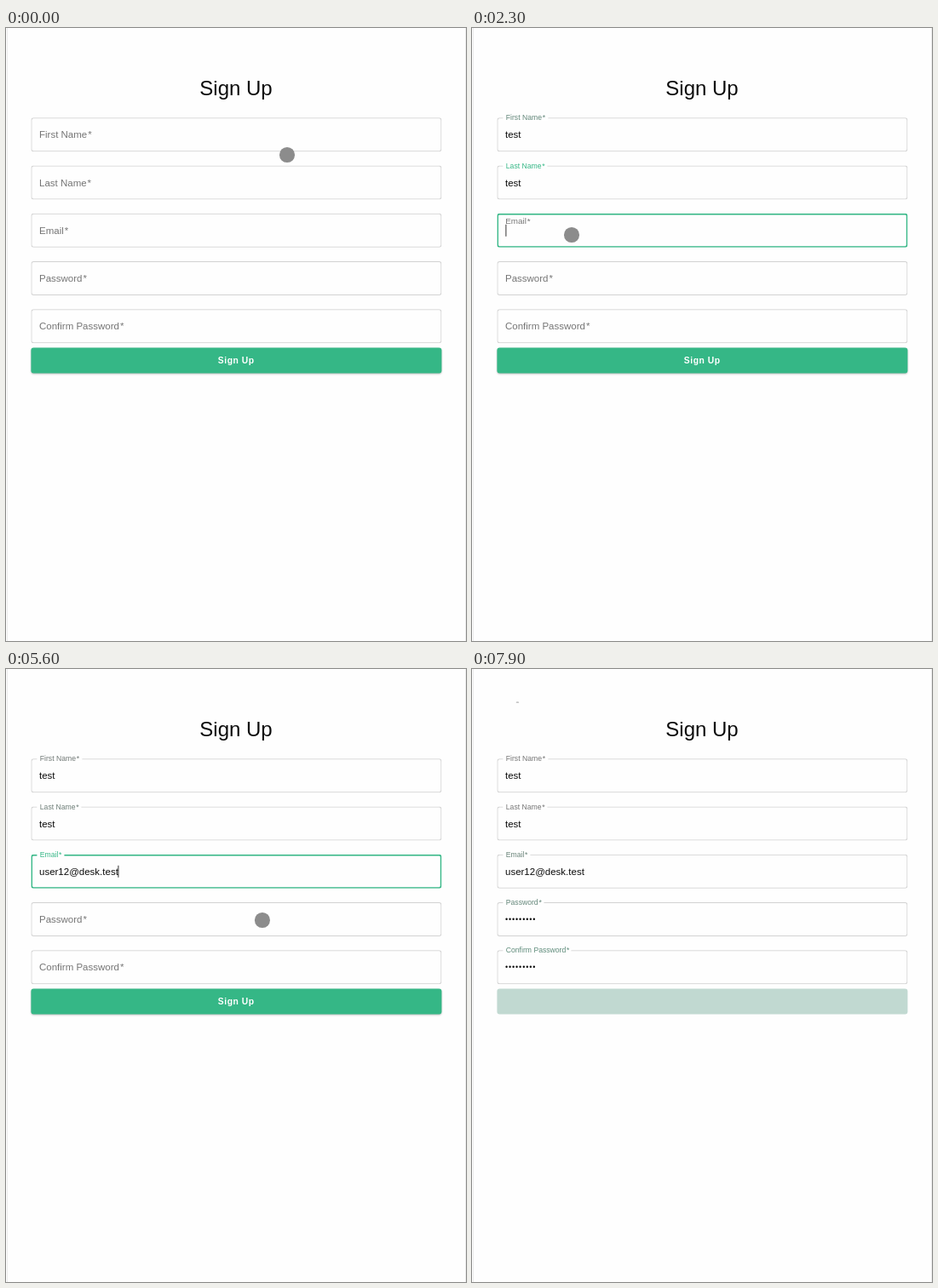
Animation of 540 by 720 pixels, one loop 8000 ms. Source, as an HTML page:

```html
<!DOCTYPE html>
<html lang="en">
<head>
<meta charset="utf-8">
<title>Sign Up</title>
<style>
  html, body { margin: 0; width: 100%; height: 100%; overflow: hidden; background: #fefefe; }
  #stage {
    position: relative; width: 540px; height: 720px; overflow: hidden;
    font-family: "Liberation Sans", Arial, sans-serif;
  }
  #stage > *, .field > * { position: absolute; }
  #stage::before {
    content: ""; position: absolute; inset: 0 0 0 1px;
    border: solid #ececec; border-width: 0 1px;
  }
  h1 {
    top: 56px; width: 100%; margin: 0; color: #0c0c0c;
    font-size: 24px; font-weight: 400; line-height: 30px; text-align: center;
  }
  .field { width: 481.6px; height: 39.6px; font-size: 11.5px; line-height: 14px; white-space: pre; }
  .box { inset: 0; border-radius: 3px; box-shadow: inset 0 0 0 1px #d2d2d2; }
  .focus .box { box-shadow: inset 0 0 0 1.6px #35b786; }
  .notch { left: 7px; top: -1px; height: 4px; background: #fefefe; }
  .label { left: 9.6px; top: 12.7px; transform-origin: 0 0; }
  .label i { margin-left: 1px; font-style: normal; }
  .value { left: 9.6px; top: 12.7px; height: 14px; color: #0c0c0c; }
  .secret .value { font-size: 9px; letter-spacing: .88px; }
  .focus .value { border-right: 1px solid #333; }
  #button {
    width: 481.6px; height: 29.6px; border-radius: 3px; transform: translate(29.4px, 375.6px);
    background: #35b786; box-shadow: 0 1px 2px rgba(0, 0, 0, .25); color: #fff;
    font-size: 10.3px; font-weight: 700; line-height: 29px; letter-spacing: .55px; text-align: center;
  }
  .sent #button { background: #c1d9d1; box-shadow: none; color: transparent; }
  #pointer { left: -8.75px; top: -8.75px; width: 17.5px; height: 17.5px; border-radius: 50%; background: #8c8c8c; }
  .sent #pointer { opacity: .5; scale: .2 .1; }
</style>
</head>
<body>
<div id="stage">
  <h1>Sign Up</h1>
  <div id="button">Sign Up</div>
  <div id="pointer"></div>
</div>
<script>
const LOOP = 8000, STEP = 100, SUBMIT = 7900;
const FLOAT = 200, TYPING = 400, TRAVEL = 300;
const GREEN = '#35b786', GRAY = '#757575';
const DOTS = '•'.repeat(9);

// A field keeps the focus until the next one takes it.
const fields = [
  { name: 'First Name', text: 'test', focus: 330, type: 600 },
  { name: 'Last Name', text: 'test', focus: 1230, type: 1500 },
  { name: 'Email', text: 'user12@desk.test', focus: 2230, type: 2800 },
  { name: 'Password', text: DOTS, focus: 5730, type: 5900 },
  { name: 'Confirm Password', text: DOTS, focus: 6730, type: 7300 }
];

// Where the pointer rests, and when it gets there.
const stops = [
  { at: 0, x: 330, y: 149 },
  { at: 300, x: 230, y: 128 },
  { at: 1300, x: 145, y: 188 },
  { at: 2200, x: 117, y: 243 },
  { at: 3400, x: 151, y: 297 },
  { at: 4400, x: 317, y: 294 },
  { at: 5800, x: 255, y: 298 },
  { at: 6600, x: 181, y: 360 },
  { at: 7700, x: 268, y: 394 }
];

const stage = document.getElementById('stage');
const button = document.getElementById('button');
const pointer = document.getElementById('pointer');
const clamp = v => Math.min(1, Math.max(0, v));
const easeOut = k => 1 - (1 - k) ** 2;
const smooth = k => k * k * (3 - 2 * k);
const move = (x, y) => `translate(${x}px, ${y}px)`;

function addField(f, i) {
  f.blur = i + 1 < fields.length ? fields[i + 1].focus : SUBMIT - STEP;
  f.el = document.createElement('div');
  f.el.className = f.text === DOTS ? 'field secret' : 'field';
  f.el.style.transform = move(29.4, 105.3 + 56.25 * i);
  f.el.innerHTML = '<div class="box"></div><div class="notch"></div>' +
    `<div class="label">${f.name}<i>*</i></div><div class="value"></div>`;
  stage.insertBefore(f.el, button);
  for (const part of ['notch', 'label', 'value']) f[part] = f.el.querySelector('.' + part);
  f.notch.style.width = f.label.offsetWidth * .75 + 6 + 'px';
}

// Green while focused, then fading slowly to gray.
function labelColor(f, t, lift) {
  if (lift < 1) return GRAY;
  if (t < f.blur + STEP) return GREEN;
  const fade = clamp(.65 + (t - f.blur) / 15000);
  return `color-mix(in srgb, ${GRAY} ${fade * 100}%, ${GREEN})`;
}

function drawField(f, t) {
  const lift = easeOut(clamp((t - f.focus) / FLOAT));
  const typed = Math.floor((t - f.type) / TYPING * f.text.length) + 1;
  f.el.classList.toggle('focus', t >= f.focus && t < f.blur);
  f.notch.style.visibility = lift > .7 ? 'visible' : 'hidden';
  f.label.style.transform = `${move(.4 * lift, -18.3 * lift)} scale(${1 - .25 * lift})`;
  f.label.style.color = labelColor(f, t, lift);
  f.value.textContent = f.text.slice(0, Math.max(0, typed));
}

function drawPointer(t) {
  let { x, y } = stops[0];
  for (const s of stops) {
    const k = smooth(clamp((t - s.at + TRAVEL) / TRAVEL));
    x += (s.x - x) * k;
    y += (s.y - y) * k;
  }
  pointer.style.transform = move(x, y);
}

fields.forEach(addField);
const start = performance.now();

function render() {
  const t = Math.floor((performance.now() - start) % LOOP / STEP) * STEP;
  fields.forEach(f => drawField(f, t));
  drawPointer(t);
  stage.classList.toggle('sent', t >= SUBMIT);
  requestAnimationFrame(render);
}
render();
</script>
</body>
</html>
```
